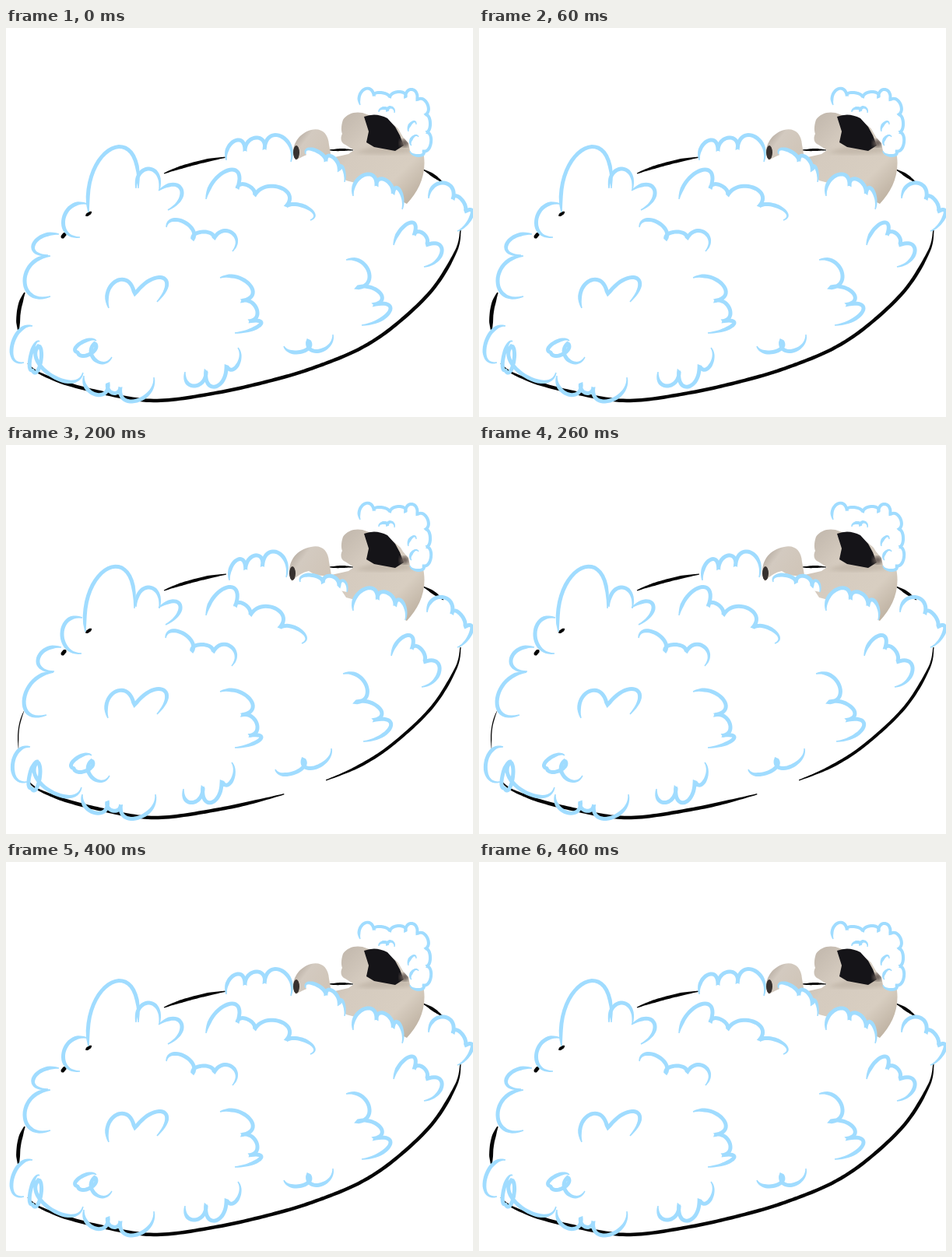
These frames come from a looping animation (600 by 500 pixels, 500 ms). An HTML page:

```html
<!DOCTYPE html>
<html lang="en">
<head>
<meta charset="utf-8">
<title>Bubble bath</title>
<style>
html, body { margin: 0; width: 100%; height: 100%; overflow: hidden; background: #fff; }
svg { display: block; width: 600px; height: 500px; }
</style>
</head>
<body>
<svg id="stage" viewBox="0 0 600 500">
  <defs>
    <linearGradient id="fur" x1="0" y1="0" x2="1" y2="1">
      <stop offset="0" stop-color="#bdb3a8"/>
      <stop offset=".35" stop-color="#d5cbbf"/>
      <stop offset=".7" stop-color="#d8cec1"/>
      <stop offset="1" stop-color="#b5a796"/>
    </linearGradient>
    <linearGradient id="arm" x1="0" y1="0" x2="1" y2=".6">
      <stop offset="0" stop-color="#a59a8f"/>
      <stop offset=".4" stop-color="#d3cac0"/>
      <stop offset="1" stop-color="#d0c5b8"/>
    </linearGradient>
    <filter id="soft"><feGaussianBlur stdDeviation="2.5"/></filter>
    <filter id="edge"><feGaussianBlur stdDeviation=".7"/></filter>
    <g id="dog">
      <path fill="url(#fur)" filter="url(#edge)" d="M433 118C438 110 448 107 458 109L495 122 517 140C530 148 537 158 537 165 540 190 530 210 515 226L475 206 437 196 418 167 440 162 447 157 436 150C429 147 430 140 432 136 430 131 431 124 433 118Z"/>
      <path fill="#b3a799" opacity=".5" filter="url(#soft)" d="M447 160Q490 166 528 158L510 152 470 153Z"/>
      <path fill="#151418" filter="url(#edge)" d="M460 114Q475 108 490 116L500 127 506 138 511 151 500 158 473 153 463 147 466 133Z"/>
      <ellipse cx="512" cy="148" rx="6" ry="5" fill="#695d57" filter="url(#soft)"/>
    </g>
  </defs>
</svg>
<script>
const BLUE = '#a0dcff', INK = '#050505', HOLD = 100, ORDER = [0, 1, 2, 3, 0];
const stage = document.getElementById('stage');

function add(parent, tag, attrs = {}) {
  const el = document.createElementNS('http://www.w3.org/2000/svg', tag);
  for (const k in attrs) el.setAttribute(k, attrs[k]);
  return parent.appendChild(el);
}

const parse = text => text.split(' ').map(p => p.split(',').map(Number));
const mix = (a, b, k) => a + (b - a) * k;

function polygon(g, pts, fill) {
  add(g, 'polygon', { fill, points: pts.map(p => p.map(v => v.toFixed(1))).join(' ') });
}

// Outline of a stroke that narrows over the given lengths at its ends.
function brush(g, pts, color, width, head, tail) {
  const run = [0];
  for (let i = 1; i < pts.length; i++) {
    run.push(run[i - 1] + Math.hypot(pts[i][0] - pts[i - 1][0], pts[i][1] - pts[i - 1][1]));
  }
  const len = run[run.length - 1], left = [], right = [];
  pts.forEach(([x, y], i) => {
    const a = pts[Math.max(0, i - 1)], b = pts[Math.min(pts.length - 1, i + 1)];
    const dx = b[0] - a[0], dy = b[1] - a[1], m = Math.hypot(dx, dy) || 1;
    const r = width / 2 * mix(0.3, 1, Math.min(1, run[i] / head, (len - run[i]) / tail));
    left.push([x - dy / m * r, y + dx / m * r]);
    right.unshift([x + dy / m * r, y - dx / m * r]);
  });
  polygon(g, left.concat(right), color);
}

// A row of round puffs: points alternate between dips and crowns.
function puffs(keys) {
  const out = [keys[0]], spread = 0.12, steps = 24;
  for (let i = 0; i + 2 < keys.length; i += 2) {
    const [p, top, q] = keys.slice(i, i + 3);
    for (let n = 1; n <= steps; n++) {
      const t = n / steps, u = 1 - t;
      out.push([0, 1].map(k => {
        const lift = (top[k] - (p[k] + q[k]) / 2) * 4 / 3, side = (q[k] - p[k]) * spread;
        return u ** 3 * p[k] + 3 * u * u * t * (p[k] + lift - side)
          + 3 * u * t * t * (q[k] + lift + side) + t ** 3 * q[k];
      }));
    }
  }
  return out;
}

// Moves the first key by (ax, ay), the last by (bx, by), the others in between.
function drift(keys, [ax, ay, bx = ax, by = ay]) {
  return keys.map(([x, y], i) => {
    const k = i / (keys.length - 1);
    return [x + mix(ax, bx, k), y + mix(ay, by, k)];
  });
}

// Keys of each curl, then its drift in the three other poses.
const foam = [
  ['283,170 294,145 307,159 321,141 332,157 353,139 366,172', [1, -1], [4, 4, -6, -2], [-6, 6, -6, -1]],
  ['385,162 397,157 411,172 420,166 428,184 433,180 435,198', [1, 1, 5, -2], [-7, 14, 3, -9], [-9, 8, 1, -2]],
  ['446,216 460,189 476,204 487,195 497,214 506,209 509,233', [0, -1], [0, -3, 4, -8], [1, -1, 3, -6]],
  ['543,219 562,199 574,221 584,219 590,236 598,242 580,261', [-2, -4, 0, -1], [-2, -4, 0, -1], [-2, -4, 0, -1]],
  ['106,237 136,155 170,206', [-4, -1, -5, 3], [-4, 3, -5, 4], [-5, 3, -4, 4]],
  ['167,206 184,181 197,208', [3, 1], [0, 2], [2, 0]],
  ['196,209 225,207 208,234', [1, 1, -5, -8], [0, 0, -3, -3], [1, 0, -3, -6]],
  ['104,226 74,245 95,269', [-2, -2, 0, -1], [-6, -4, 2, -1], [-10, -6, -4, -1]],
  ['68,265 36,277 54,292', [-2, -4, 2, -1], [3, -5, 8, -1], [0, -6, 8, -3]],
  ['57,293 24,325 57,345', [0, -2, -5, 2], [4, -1, -5, 2], [5, -5, -4, -3]],
  ['257,220 285,183 297,207 310,202 319,216 352,205 359,230 387,231 391,247', [1, -4, -6, 8], [0, -1, -11, 8], [0, 0, -11, 8]],
  ['206,256 228,249 240,272 253,262 267,271 290,263 291,287', [-6, -10, 2, -4], [-1, -8, -1, -3], [0, -5, -3, -9]],
  ['132,360 142,325 165,343 201,321 194,352', [0, -5, -4, -2], [-1, -9, 0, -6], [-1, -9, 7, -4]],
  ['275,321 313,330 301,351 322,361 311,377 326,382 294,392', [2, 1, 6, 0], [0, -4, 0, -3], [4, -7, 4, -4]],
  ['437,298 466,313 449,334 480,340 470,356 493,364 457,382', [-2, -8, 6, 2], [-4, -4, 2, -1], [-1, -6, 7, -2]],
  ['498,279 517,251 524,267 536,264 540,279 560,287 537,307', [-2, -4, -5, 4], [-3, -8, -3, 4], [-3, -8, -4, 4]],
  ['357,409 380,416 388,401 403,415 420,394', [-2, 8, -1, 2], [-11, 8, -2, -4], [-11, 8, -2, -4]],
  ['230,442 243,460 257,439 269,461 283,433 297,434 298,411', [0, 0], [-2, 0, -8, -3], [-2, 0, -8, -4]],
  ['116,402 96,405 92,417 108,419 114,405 115,427 136,423', [0, -3, 0, 4], [-6, -3, -3, 2], [-5, -2, -3, -4]],
  ['34,383 8,407 23,430', [0, 4, 3, 1], [-3, 5, 4, 3], [-3, -7, 4, 2]],
  ['43,403 32,420 34,440 44,432 42,408 59,447 99,443', [2, 1, -2, 0], [-1, 3, -2, -3], [-2, 0, 0, 5]],
  ['100,447 115,471 131,456 137,469 147,461 168,479 190,449', [1, 0, -1, -3], [-2, 2, 2, 0], [0, 6, -2, 6]]
].map(([keys, ...moves]) => [[0, 0], ...moves].map(m => puffs(drift(parse(keys), m))));

const hat = [
  '455,99 460,79 473,88 482,83 493,90 505,82 513,90 522,79 528,93 541,97 538,112 545,122 539,134 546,147 536,158 530,164 519,158',
  '479,108 485,103 490,107 495,102 499,109',
  '517,133 521,122 527,124',
  '521,151 522,141 530,140'
].map(keys => puffs(parse(keys)));
const brim = parse('517,148 510,140 503,128 495,117 485,113 470,108 458,109');
const hatRise = [0, -3, -3, -1];

// Tub rim, clockwise from the right end; each pose inks some stretches of it.
const rim = parse('584,260 578,287 548,336 500,382 455,412 400,435 345,452 270,469 190,479 120,468 60,451 28,431 16,390 24,340 73,268 106,239 150,212 203,187 243,174 283,166 350,158 414,157 446,157 490,163 536,182 562,199');
const always = [[13.96, 14.1, 5], [14.9, 15.1, 4], [17, 19, 4], [21, 22, 3], [24, 25, 4]];
const inked = [
  [[0, 11, 4.5], [12, 13, 5]],
  [[0, 5.6, 4], [5.6, 11, 4.5], [12, 13, 1.5]],
  [[0, 4.8, 4], [5.8, 11, 4.5], [12, 13, 1.3]],
  [[0, 2.6, 4], [3.2, 5.9, 4], [6, 9.2, 4.5], [9.4, 11, 4], [12, 13, 1.2]]
];

function rimPoint(u) {
  const i = Math.min(Math.floor(u), rim.length - 2), t = u - i;
  const [a, b, c, d] = [-1, 0, 1, 2].map(n => rim[Math.max(0, Math.min(rim.length - 1, i + n))]);
  return [0, 1].map(k => b[k] + t / 2 * (c[k] - a[k]
    + t * (2 * a[k] - 5 * b[k] + 4 * c[k] - d[k] + t * (3 * (b[k] - c[k]) + d[k] - a[k]))));
}

function inkRim(g, [from, to, width]) {
  const n = Math.ceil((to - from) * 16) + 4;
  const pts = Array.from({ length: n + 1 }, (_, i) => rimPoint(mix(from, to, i / n)));
  const taper = Math.min(50, (to - from) * 12);
  brush(g, pts, INK, width, taper, taper);
}

function drawPaw(g, reach) {
  const x = 369 - reach, y = 162 + reach;
  add(g, 'path', {
    fill: 'url(#arm)', filter: 'url(#edge)',
    d: `M${x} ${y}C${x - 1} 149 ${x + 8} 135 392 131 406 128 414 136 415 150L418 167Q402 171 389 162 ${x + 14} 164 ${x + 3} ${y + 8}Z`
  });
  add(g, 'ellipse', { cx: x + 4, cy: y - 2, rx: 4, ry: 9, fill: '#37312f', filter: 'url(#edge)' });
}

function buildScene(pose) {
  const g = add(stage, 'g');
  for (const arc of always.concat(inked[pose])) inkRim(g, arc);
  drawPaw(g, pose > 1 ? 5 : 0);
  add(g, 'use', { href: '#dog' });
  for (const curl of foam.slice(1, 3)) polygon(g, curl[pose], '#fff');
  for (const curl of foam) brush(g, curl[pose], BLUE, 5, 14, 26);
  const cap = add(g, 'g', { transform: `translate(0 ${hatRise[pose]})` });
  polygon(cap, hat[0].concat(brim), '#fff');
  for (const curl of hat) brush(cap, curl, BLUE, 4, 8, 12);
  return g;
}

const scenes = inked.map((_, pose) => buildScene(pose));

function draw(t) {
  const pose = ORDER[Math.floor(t / HOLD) % ORDER.length];
  scenes.forEach((g, i) => g.setAttribute('display', i === pose ? 'inline' : 'none'));
}

const start = performance.now();
function tick() {
  draw(performance.now() - start);
  requestAnimationFrame(tick);
}
tick();
</script>
</body>
</html>
```
